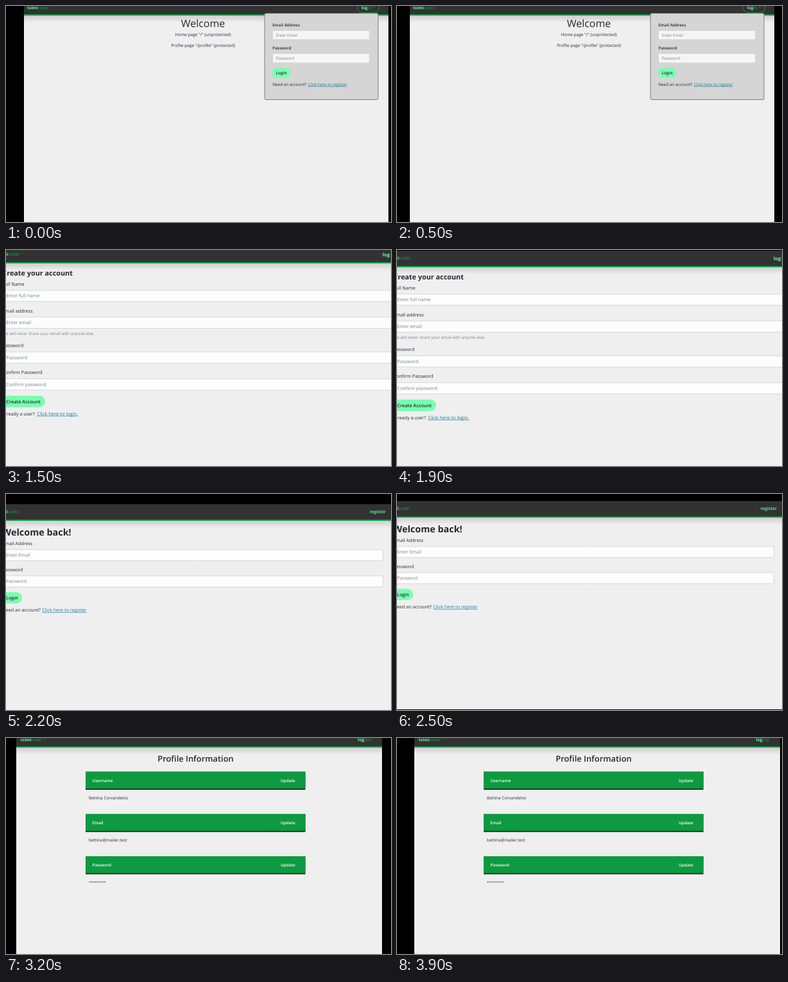
Recreate the animation shown at these times as an HTML page with a canvas. Size 600 px wide and 338 px high, loop 4000 ms.

```html
<!DOCTYPE html>
<html lang="en">
<head>
<meta charset="utf-8">
<title>Account pages</title>
<style>
  html, body { margin: 0; width: 100%; height: 100%; overflow: hidden; background: #000; }
  canvas { display: block; }
</style>
</head>
<body>
<canvas id="stage" width="600" height="338"></canvas>
<script>
const ctx = document.getElementById('stage').getContext('2d');
const INK = '#25292d', MUTED = '#7b8188', BRIGHT = '#72f7a3', GREEN = '#129443', MINT = '#79ffb0';

// y is the middle of the capital letters; returns the text width
function text(str, x, y, size, { color = INK, weight = 400, align = 'left' } = {}) {
  ctx.font = `${weight} ${size}px "Open Sans", "Noto Sans", sans-serif`;
  ctx.textRendering = 'geometricPrecision';
  ctx.textAlign = align;
  ctx.fillStyle = color;
  ctx.fillText(str, x, y + size * 0.35);
  return ctx.measureText(str).width;
}

function rect(x, y, w, h, fill) {
  ctx.fillStyle = fill;
  ctx.fillRect(x, y, w, h);
}

function box(x, y, w, h, radius, fill, stroke) {
  ctx.beginPath();
  ctx.roundRect(x, y, w, h, radius);
  if (fill) { ctx.fillStyle = fill; ctx.fill(); }
  if (stroke) { ctx.strokeStyle = stroke; ctx.lineWidth = 1; ctx.stroke(); }
}

function link(str, x, y, size) {
  const color = '#1b7f9f';
  const width = text(str, x, y, size, { color });
  rect(x, y + size * 0.48, width, 0.7, color);
}

function field(x, y, w, h, hint, hintX, size, fill = '#fdfdfd') {
  box(x + 0.5, y + 0.5, w - 1, h - 1, 2, fill, '#d3d6da');
  text(hint, hintX, y + h / 2, size, { color: MUTED });
}

function button(label, x, y, w, h, labelX, size) {
  box(x, y, w, h, h / 2, MINT);
  text(label, labelX, y + h / 2, size, { weight: 600 });
}

function caret(x, y) {
  ctx.fillStyle = GREEN;
  ctx.beginPath();
  ctx.moveTo(x, y);
  ctx.lineTo(x + 3, y);
  ctx.lineTo(x + 1.5, y + 1.6);
  ctx.fill();
}

function page(x, y, w, h, barHeight) {
  rect(x, y, w, h, '#f0eff0');
  rect(x, y, w, barHeight, '#323232');
  const base = y + barHeight + 2;
  const shade = ctx.createLinearGradient(0, base, 0, base + 11);
  shade.addColorStop(0, 'rgba(0,0,0,.14)');
  shade.addColorStop(1, 'rgba(0,0,0,0)');
  rect(x, base, w, 11, shade);
  rect(x, base - 2, w, 2, '#14a049');
}

// Two-tone label whose colours meet at x
function duo(first, second, x, y, size) {
  text(first, x, y, size, { color: BRIGHT, weight: 700, align: 'right' });
  text(second, x, y, size, { color: GREEN, weight: 600 });
}

const brand = (x, y, size) => duo('tolmi', 'code!', x, y, size);

function home() {
  page(0, -11, 568, 360, 24);
  brand(21.7, 2.5, 6.3);
  box(519.5, -6, 34, 16.5, 8, null, GREEN);
  duo('log', 'in', 535.5, 2.5, 6.5);
  caret(543.5, 1);

  const centered = { align: 'center' };
  text('Welcome', 279, 27, 16, centered);
  text('Home page "/" (unprotected)', 279, 44.5, 6.5, centered);
  text('Profile page "/profile" (protected)', 279, 61.3, 6.5, centered);

  box(375, 11.5, 177, 135, 2, '#d5d5d5', '#7c7c7c');
  text('Email Address', 387.3, 29.5, 6.3, { weight: 600 });
  field(387, 38, 152, 15, 'Enter Email', 392.7, 6.25, '#f5f5f5');
  text('Password', 387.3, 66, 6.3, { weight: 600 });
  field(387, 74, 152, 15.5, 'Password', 392.7, 6.3, '#f5f5f5');
  button('Login', 387, 97, 28.5, 15.5, 392.6, 6.5);
  text('Need an account?', 387.2, 122.5, 6.4);
  link('Click here to register', 442.8, 122.5, 6.36);
}

function register() {
  const left = -5.7, size = 7.3;
  page(-10, -13, 640, 380, 24);
  brand(2.8, -1, 7);
  duo('log', 'in', 598, -1, 7.6);

  text('Create your account', left, 28.5, 10.85, { weight: 700 });
  const input = (label, hint, y) => {
    text(label, left, y, size);
    field(left, y + 9.5, 640, 18.5, hint, 0.3, size);
  };
  input('Full Name', 'Enter full name', 45);
  input('Email address', 'Enter email', 87);
  text('We will never share your email with anyone else.', left, 123, 6.36, { color: MUTED });
  input('Password', 'Password', 141.6);
  input('Confirm Password', 'Confirm password', 183.7);
  button('Create Account', left, 220, 66.7, 18, 0.3, size);
  text('Already a user?', left, 248, 7.2);
  link('Click here to login.', 48.4, 248, 7.5);
}

function login() {
  const left = -5.7, size = 7.15;
  page(-10, 0, 640, 326, 24);
  brand(2.5, 11.5, 6.7);
  text('register', 592, 11.5, 6.9, { color: BRIGHT, weight: 600, align: 'right' });

  text('Welcome back!', left, 44, 14.4, { weight: 700 });
  text('Email Address', left, 61.5, size);
  field(left, 70.5, 593.7, 18.5, 'Enter Email', 0, size);
  text('Password', left, 102.5, size);
  field(left, 111.5, 593.7, 18.5, 'Password', 0, size);
  button('Login', left, 137.5, 30.7, 17.5, 0, 7.2);
  text('Need an account?', left, 165.4, 7.2);
  link('Click here to register', 56.3, 165.4, 7.25);
}

function profile() {
  page(0, -11, 570, 360, 24);
  brand(23.5, 2.5, 6.3);
  caret(42.5, 1);
  duo('log', 'out', 542.3, 2.5, 6.7);

  text('Profile Information', 279.5, 32, 12.9, { weight: 600, align: 'center' });
  const white = { color: '#fff', weight: 600 };
  const row = (label, value, y, size, drop) => {
    rect(108, y, 342.5, 28.3, '#17301f');
    rect(108, y, 342.5, 26.5, '#0d9a40');
    text(label, 118.5, y + 13.8, 6.4, white);
    text('Update', 412, y + 13.8, 6.4, white);
    text(value, 113, y + drop, size);
  };
  row('Username', 'Bettina Corvandelos', 52.7, 6.5, 41);
  row('Email', 'bettina@mailer.test', 118.9, 6.5, 41);
  row('Password', '*********', 185, 5.3, 41.2);
}

// Each scene lasts one second and pans along one axis, in px per step
const STEP = 100, STEPS = 10, SPEED = 1.6;
const scenes = [
  { draw: home, start: 28.9, dx: -1 },
  { draw: register, start: 0.5, dy: 1 },
  { draw: login, start: 19.4, dy: -1 },
  { draw: profile, start: 12.9, dx: 1 },
];

function render(now) {
  const step = Math.floor(now / STEP) % (STEPS * scenes.length);
  const { draw, start, dx, dy } = scenes[Math.floor(step / STEPS)];
  const offset = Math.floor(start + SPEED * (dx || dy) * (step % STEPS));
  ctx.setTransform(1, 0, 0, 1, 0, 0);
  rect(0, 0, 600, 338, '#000');
  ctx.translate(dx ? offset : 0, dy ? offset : 0);
  draw();
}

const begin = performance.now();
function loop() {
  render(performance.now() - begin);
  requestAnimationFrame(loop);
}
loop();
</script>
</body>
</html>
```
